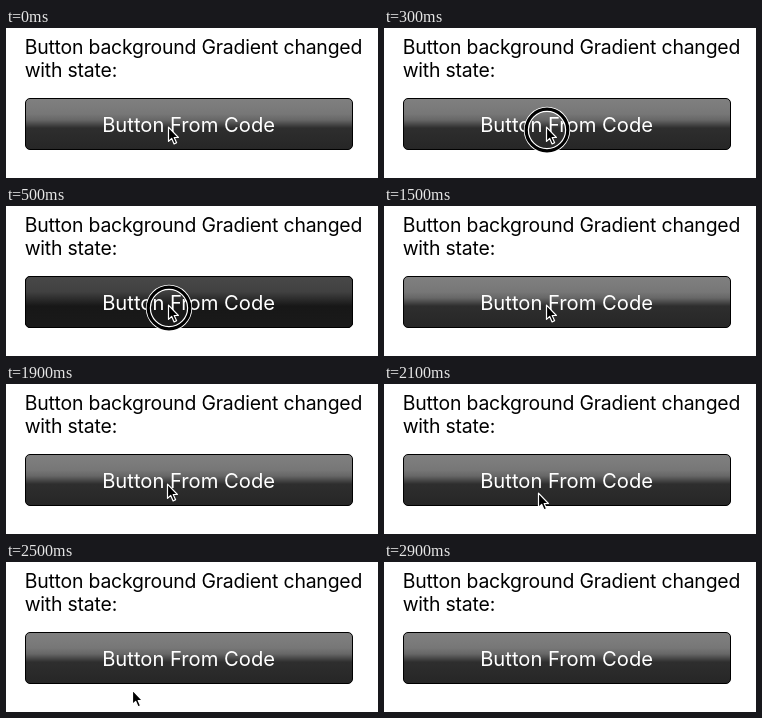
An HTML page that plays this animation: 372 by 150 pixels, repeating every 4200 ms.

```html
<!DOCTYPE html>
<html lang="en">
<head>
<meta charset="utf-8">
<title>Button gradient</title>
<style>
  html, body { margin: 0; width: 100%; height: 100%; overflow: hidden; background: #fff; }
  svg { display: block; width: 372px; height: 150px; }
  text { font-family: Inter, "Liberation Sans", sans-serif; font-size: 19.4px; }
  .note { letter-spacing: -.19px; }
  .label { fill: #fff; font-size: 20.2px; text-anchor: middle; }
  .down, .ring { opacity: 0; animation: 4.2s step-end infinite; }
  .down { animation-name: press; }
  .ring { animation-name: click; fill: none; }
  .cursor { animation: move 4.2s step-end infinite; }

  @keyframes press {
    0% { opacity: 0 }
    9.5238% { opacity: .5 }
    11.9047% { opacity: 1 }
    35.7142% { opacity: 0 }
  }
  @keyframes click {
    0% { opacity: 0 }
    7.1428% { opacity: 1 }
    35.7142% { opacity: 0 }
  }
  @keyframes move {
    0% { transform: translate(162px, 99px) }
    45.238% { transform: translate(161px, 100px) }
    47.619% { transform: translate(159px, 104px) }
    50% { transform: translate(154px, 109px) }
    52.3809% { transform: translate(147px, 118px) }
    54.7619% { transform: translate(140px, 126px) }
    57.1428% { transform: translate(133px, 129px) }
    59.5238% { transform: translate(126px, 128px) }
    61.9047% { transform: translate(112px, 122px) }
    64.2857% { transform: translate(82px, 104px) }
    66.6666% { transform: translate(45px, 74px) }
    69.0476%, 100% { transform: translate(-40px, 40px) }
  }
</style>
</head>
<body>
<svg viewBox="0 0 372 150">
  <defs>
    <linearGradient id="up" x2="0" y2="1">
      <stop offset="0" stop-color="#808080"/>
      <stop offset=".3" stop-color="#777"/>
      <stop offset=".42" stop-color="#676767"/>
      <stop offset=".58" stop-color="#2e2e2e"/>
      <stop offset="1" stop-color="#262626"/>
    </linearGradient>
    <linearGradient id="pressed" x2="0" y2="1">
      <stop offset="0" stop-color="#484848"/>
      <stop offset=".3" stop-color="#414141"/>
      <stop offset=".58" stop-color="#171717"/>
      <stop offset="1" stop-color="#1a1a1a"/>
    </linearGradient>
  </defs>

  <text class="note" x="18.7" y="26">Button background Gradient changed</text>
  <text class="note" x="18.7" y="49.3">with state:</text>

  <g stroke="#000">
    <rect x="19.5" y="70.5" width="327" height="51" rx="4.5" fill="url(#up)"/>
    <rect class="down" x="19.5" y="70.5" width="327" height="51" rx="4.5" fill="url(#pressed)"/>
  </g>
  <text class="label" x="182.6" y="104">Button From Code</text>

  <g class="ring">
    <circle cx="163" cy="102" r="20.6" stroke="#fff" stroke-width="5.2"/>
    <circle cx="163" cy="102" r="20.8" stroke="#000" stroke-width="3.2"/>
  </g>
  <path class="cursor" d="M.5 .2V14.4L3.7 11.5L6.1 16.9L8.6 15.8L6.2 10.5H10.4Z" fill="#000" stroke="#fff" stroke-width="1.2" stroke-linejoin="round"/>
</svg>
</body>
</html>
```
